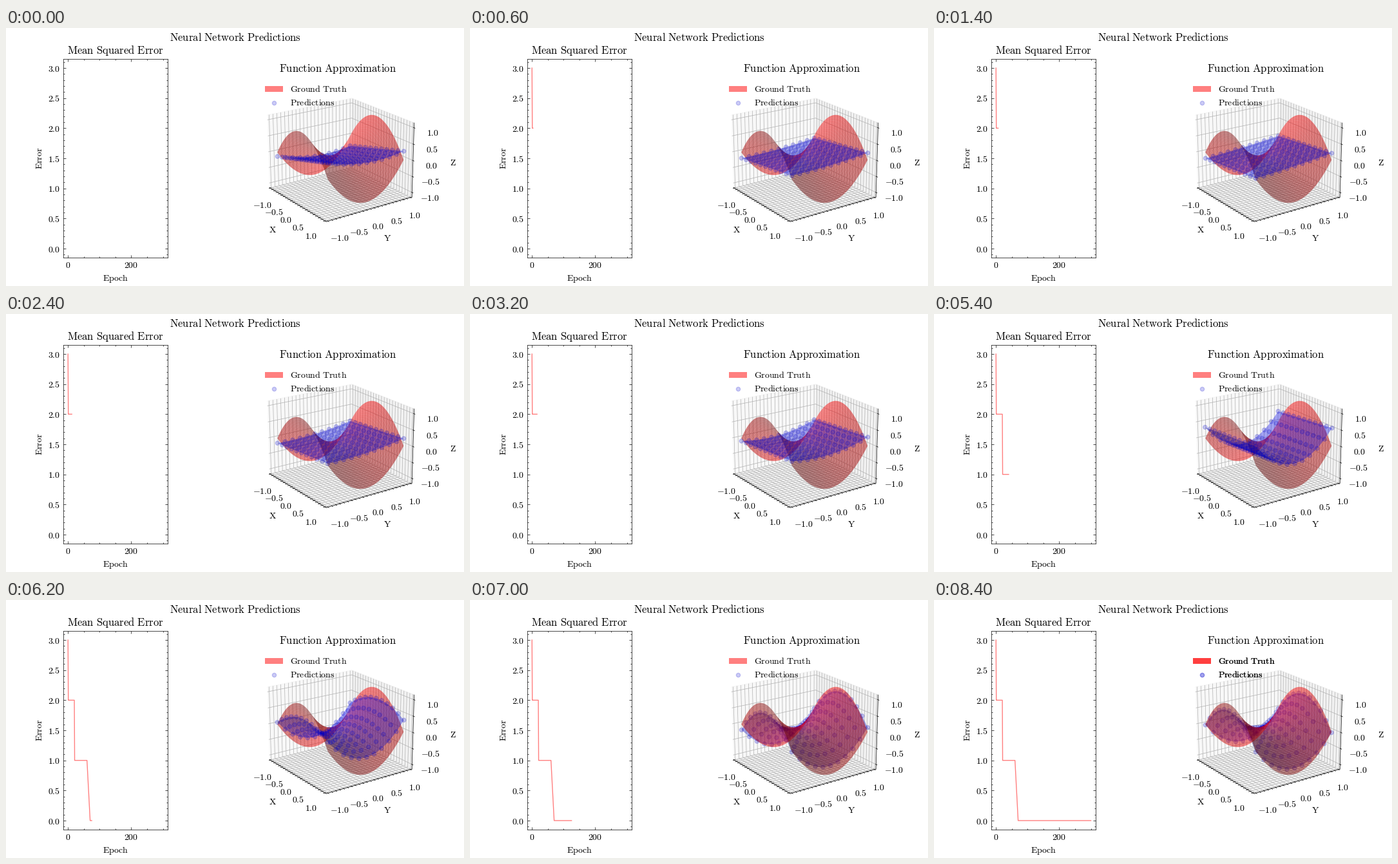
Recreate the animation shown at these times as a matplotlib script. Size 711 px wide and 400 px high, loop 8600 ms.

```python
import numpy as np
import matplotlib.pyplot as plt
from matplotlib.animation import FuncAnimation
from matplotlib.patches import Patch
from matplotlib.ticker import FuncFormatter, MultipleLocator

plt.rcParams.update({
    'mathtext.fontset': 'cm', 'axes.linewidth': 0.5, 'grid.linewidth': 0.5,
    'lines.linewidth': 1, 'legend.frameon': False,
    'xtick.top': True, 'ytick.right': True})
for k in 'xy':
    plt.rcParams.update({
        f'{k}tick.direction': 'in', f'{k}tick.major.size': 3,
        f'{k}tick.minor.size': 1.5, f'{k}tick.major.width': 0.5,
        f'{k}tick.minor.width': 0.5, f'{k}tick.minor.visible': True})

DOTS = dict(s=20, color='mediumblue', alpha=0.2)
LIMIT = 1.1 * 25 / 24


def roman(s):
    return r'$\mathrm{%s}$' % s.replace(' ', r'\ ')


def ticks(axis, step, digits):
    axis.set_major_locator(MultipleLocator(step))
    axis.set_major_formatter(FuncFormatter(lambda v, _: f'${v:.{digits}f}$'))


def ease(i, start, end):
    t = np.clip((i - start) / (end - start), 0, 1)
    return t * t * (3 - 2 * t)


def predict(x, y, i):
    """A tilted plane folds along y, then bends down along x."""
    start = np.exp(-i / 2)
    fold = min(1, i / 27) ** 3
    saddle = ease(i, 27, 35)
    valley = fold * (1 - saddle)
    tilt = 0.1 * (1 - ease(i, 32, 42))
    plane = tilt * (x + y * (1 - valley)) - 0.35 * valley
    first = start * (0.2 * x - 0.2 * y + 0.17 * y**2 - 0.1)
    return plane + first + 0.8 * fold * y**2 - 0.82 * saddle * x**2


# Snapshots get sparser as training goes on.
epochs = np.array([e for e in range(301)
                   if e < 25 or e % 25 == 0 or (e < 100 and e % 10 == 0)])
errors = np.select([epochs < 1, epochs < 21, epochs < 70], [3, 2, 1], 0)
N = len(epochs)

fig = plt.figure(figsize=(7.11, 4), dpi=100)
fig.suptitle(roman('Neural Network Predictions'), y=0.984)

ax = fig.add_subplot(131)
ax.set_title(roman('Mean Squared Error'))
ax.set_xlabel(roman('Epoch'))
ax.set_ylabel(roman('Error'))
line, = ax.plot([], [], color='red', alpha=0.5)
dot_key = ax.scatter([], [], **DOTS)
ax.set(xlim=(-15, 315), ylim=(-0.15, 3.15))
ticks(ax.xaxis, 200, 0)
ticks(ax.yaxis, 0.5, 1)

ax3 = fig.add_subplot(122, projection='3d')
ax3.set_title(roman('Function Approximation'))
ax3.view_init(20, -35)
gx, gy = np.meshgrid(np.linspace(-1, 1, 50), np.linspace(-1, 1, 50))
ax3.plot_surface(gx, gy, gy**2 - gx**2, color='red', alpha=0.5)

legends = []
for _ in range(2):
    legends.append(ax3.legend(
        [Patch(facecolor='red', edgecolor='none', alpha=0.5), dot_key],
        [roman('Ground Truth'), roman('Predictions')],
        loc='upper left', bbox_to_anchor=(0, 1.004), labelspacing=0.45))
ax3.add_artist(legends[0])

for name, axis in zip('XYZ', (ax3.xaxis, ax3.yaxis, ax3.zaxis)):
    axis.set_rotate_label(False)
    axis.set_label_text(roman(name))
    ticks(axis, 0.5, 1)

px, py = np.meshgrid(np.linspace(-1, 1, 11), np.linspace(-1, 1, 11))
shown = []


def update(i):
    while shown:
        shown.pop().remove()
    pz = predict(px, py, i)
    shown.append(ax3.plot_surface(px, py, pz, color='blue', alpha=0.35))
    shown.append(ax3.scatter(px, py, pz, **DOTS))
    for set_lim in (ax3.set_xlim, ax3.set_ylim, ax3.set_zlim):
        set_lim(-LIMIT, LIMIT, view_margin=0)
    line.set_data(epochs[:i + 1], errors[:i + 1])
    legends[1].set_visible(i == N - 1)


anim = FuncAnimation(fig, update, frames=N, interval=200, repeat=True,
                     init_func=lambda: None)
plt.show()
```
